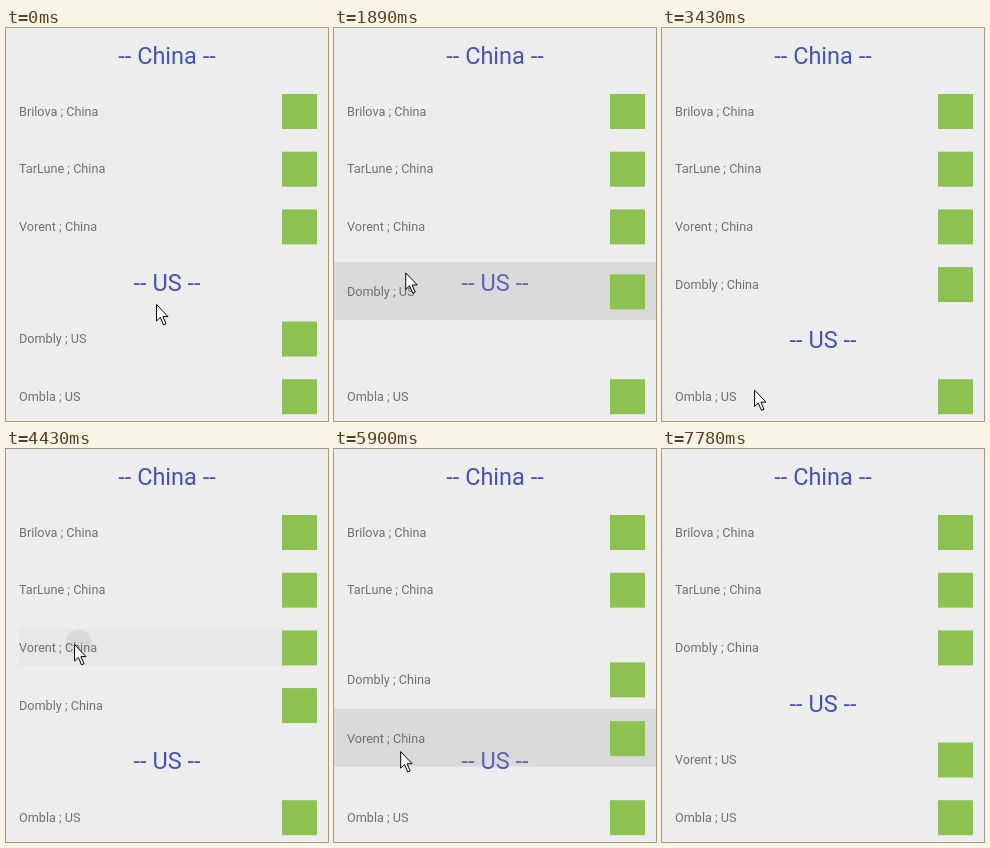
These frames come from a looping animation (322x393 px, 8 s). An HTML page:

```html
<!DOCTYPE html>
<html lang="en">
<head>
<meta charset="utf-8">
<title>Grouped list drag</title>
<style>
html, body { margin: 0; width: 100%; height: 100%; overflow: hidden; background: #ededed; }
svg { display: block; width: 322px; height: 393px; font-family: Roboto, sans-serif; }
.head { font-size: 23.5px; fill: #4354b6; text-anchor: middle; }
.row { font-size: 12.65px; fill: #707070; }
</style>
</head>
<body>
<svg id="stage" viewBox="0 0 322 393">
  <clipPath id="cell"><rect x="13" y="-19" width="264" height="38"/></clipPath>
</svg>
<script>
const LOOP = 8000;
const ROW = 57.7, TOP = 83, HEAD = 254;
const LOW = 310.5;
const slot = i => TOP + i * ROW;
const stage = document.getElementById('stage');

function add(parent, tag, attrs, text) {
  const el = document.createElementNS('http://www.w3.org/2000/svg', tag);
  for (const k in attrs) el.setAttribute(k, attrs[k]);
  if (text) el.textContent = text;
  parent.appendChild(el);
  return el;
}
const move = (el, x, y) => el.setAttribute('transform', `translate(${x} ${y})`);
const clamp = (v, lo, hi) => Math.min(hi, Math.max(lo, v));
const ramp = (t, a, b) => clamp((t - a) / (b - a), 0, 1);
const smooth = p => p * p * (3 - 2 * p);
const slowing = p => Math.sin(p * Math.PI / 2);
const mix = (a, b, p) => a + (b - a) * p;
const tween = (t, start, time, a, b) => mix(a, b, smooth(ramp(t, start, start + time)));

function header(name, y) {
  const g = add(stage, 'g', {});
  add(g, 'text', { class: 'head', x: 161, y: 8.5 }, `-- ${name} --`);
  move(g, 0, y);
  return g;
}

function row(name, group, y) {
  const g = add(stage, 'g', {});
  const lift = add(g, 'rect', { y: -29.5, width: 322, height: 58, fill: '#a1a1a1', opacity: 0 });
  const press = add(g, 'g', { 'clip-path': 'url(#cell)', opacity: 0 });
  add(press, 'rect', { x: 13, y: -19, width: 264, height: 38, fill: '#e8e8e8' });
  const ripple = add(press, 'circle', { cx: 72.5, cy: -5, fill: '#dadada' });
  const label = add(g, 'text', { class: 'row', x: 13, y: 4.5 });
  add(g, 'rect', { x: 276, y: -17, width: 35, height: 35, fill: '#8dc152' });
  const item = { g, lift, press, ripple, label, name };
  place(item, y, group);
  return item;
}

function place(item, y, group) {
  move(item.g, 0, y);
  const text = `${item.name} ; ${group}`;
  if (item.label.textContent !== text) item.label.textContent = text;
}

// Pointer strokes: each one starts where the last ended
const strokes = [
  { from: 60, to: 470, x: 66, y: 304, ease: smooth },
  { from: 1600, to: 2240, x: 74, y: 213, ease: slowing },
  { from: 2490, to: 3250, x: 84, y: 340, ease: smooth },
  { from: 3310, to: 3480, x: 94, y: 367, ease: smooth },
  { from: 3480, to: 4060, x: 68, y: 195, ease: smooth },
  { from: 5380, to: 6110, x: 66, y: 314, ease: slowing },
  { from: 6180, to: 6300, x: 66, y: 328, ease: smooth },
  { from: 6670, to: 7430, x: 105, y: 328, ease: smooth },
  { from: 7490, to: 7780, x: 204, y: 390, ease: smooth }
];

function pointer(t) {
  let x = 150, y = 276;
  for (const s of strokes) {
    const p = s.ease(ramp(t, s.from, s.to));
    x = mix(x, s.x, p);
    y = mix(y, s.y, p);
  }
  return { x, y };
}

// A dragged row follows the pointer, then settles into its new slot
function dragY(t, d) {
  if (t < d.lift) return d.home;
  const held = clamp(pointer(Math.min(t, d.drop)).y + d.grab, slot(2), LOW);
  return tween(t, d.drop, 250, held, d.target);
}

function feedback(item, t, d) {
  const hold = d.down + 500;
  const on = t >= d.down ? 1 - ramp(t, hold, hold + 250) : 0;
  item.press.setAttribute('opacity', on);
  item.ripple.setAttribute('r', 13 + 150 * ramp(t, d.down + 30, hold + 100) ** 2);
  item.lift.setAttribute('opacity', 0.25 * ramp(t, hold, hold + 200) * (1 - ramp(t, d.drop, d.drop + 260)));
}

header('China', 27.5);
const us = header('US', HEAD);
row('Brilova', 'China', slot(0));
row('TarLune', 'China', slot(1));
row('Ombla', 'US', LOW + ROW);
const first = row('Dombly', 'US', LOW);
const second = row('Vorent', 'China', slot(2));
const cursor = add(stage, 'path', {
  d: 'M.5 .5V17L4.3 13.4 7.5 20.8 10 19.7 6.9 12.6H12Z',
  fill: '#fff', stroke: '#000', 'stroke-width': 1
});

const up = { down: 840, lift: 1600, drop: 2660, grab: 19, home: LOW, target: slot(3) };
const down = { down: 4430, lift: 5380, drop: 6650, grab: -13, home: slot(2), target: LOW };

function draw(t) {
  const shift = tween(t, 1980, 250, 0, ROW) - tween(t, 6180, 120, 0, ROW);
  move(us, 0, HEAD + shift);

  const pass = tween(t, 5785, 250, 0, ROW);
  place(first, dragY(t, up) - pass, t < 2000 ? 'US' : 'China');
  place(second, dragY(t, down), t < 6240 ? 'China' : 'US');
  feedback(first, t, up);
  feedback(second, t, down);

  const { x, y } = pointer(t);
  move(cursor, x, y);
  cursor.setAttribute('visibility', t < 7780 ? 'visible' : 'hidden');
}

const start = performance.now();
function tick() {
  draw((performance.now() - start) % LOOP);
  requestAnimationFrame(tick);
}
tick();
</script>
</body>
</html>
```
